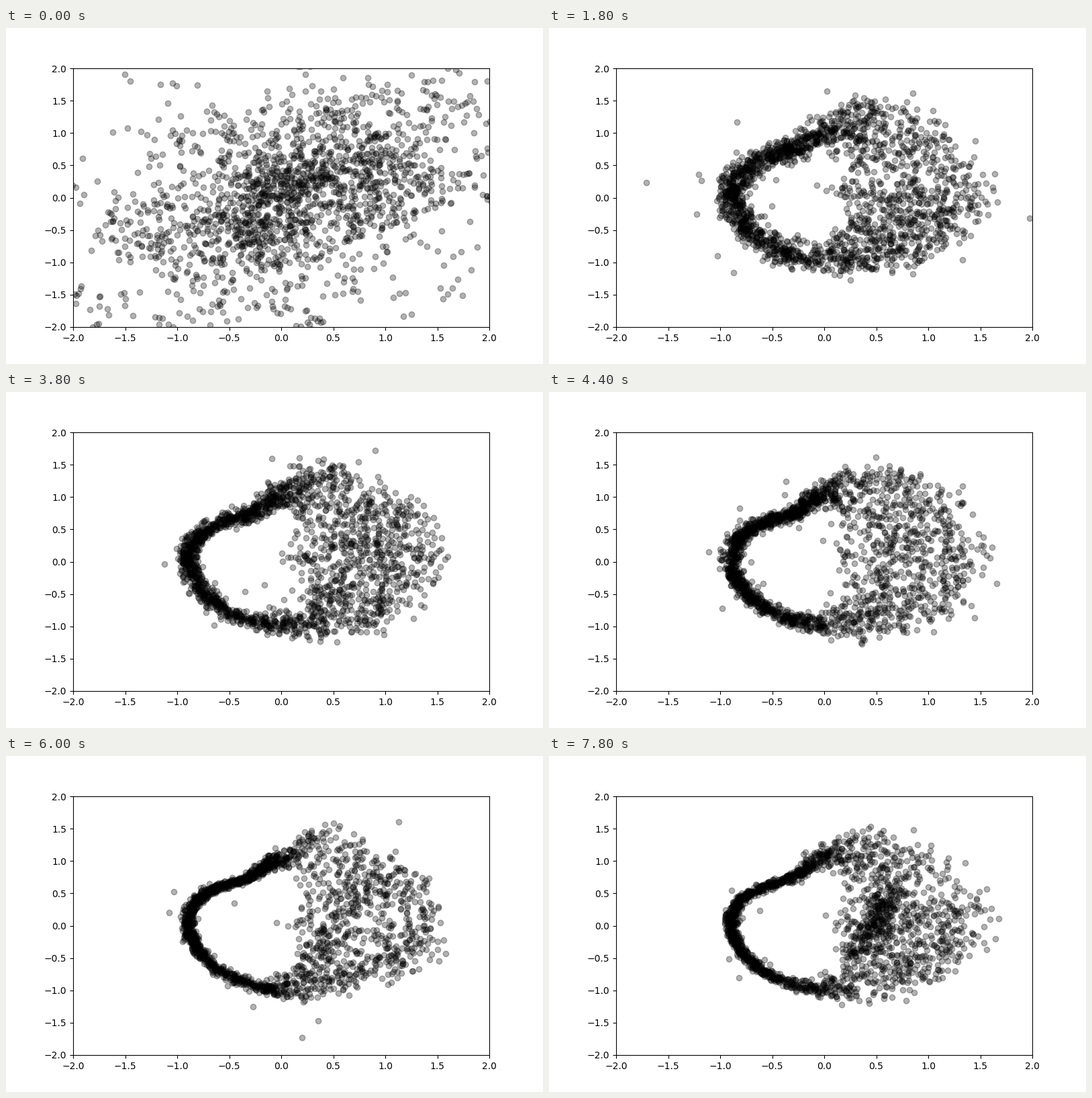
Write a matplotlib script that moves like this. It is 800x500 px and loops after 8000 ms.

```python
import numpy as np
import matplotlib.pyplot as plt
from matplotlib.animation import FuncAnimation

FRAMES, STEP = 40, 200
COUNT, PARENTS = 2000, 1100
OUTER = np.array([.3, .1])    # centre of the rim
INNER = np.array([.2, .05])   # point the right side fills towards


def bump(a, mid, width):
    return np.exp(-((a - mid) / width) ** 2)


def clump(rng, parents, jitter):
    """Scatter the points around randomly shared parents."""
    pick = rng.integers(len(parents), size=COUNT)
    return parents[pick] + jitter * rng.normal(size=(COUNT, 2))


def start_cloud(rng):
    core = rng.multivariate_normal([0, 0], [[.7, .27], [.27, .6]], PARENTS)
    tail = np.sqrt(5 / rng.chisquare(5, (PARENTS, 1)))
    return clump(rng, [.17, .1] + core * tail, .09)


def ring(rng, t):
    late = np.clip((t - 1) / 5, 0, 1) ** .6
    u, v = clump(rng, rng.random((PARENTS, 2)), [.01, .06]).T

    # More points end up on the left side as time passes
    b = 2 * np.pi * (u % 1)
    a = b + (.15 + .25 * late) * np.sin(b)
    radius = 1.2 - .3 * bump(a, 2.3, .45) + .2 * bump(a, 1.4, .3)
    rim = OUTER + radius[:, None] * np.column_stack([np.cos(a), np.sin(a)])

    # Thin on the left, filled on the right
    fill = 1 / (1 + np.exp(-(3.5 + 2.5 * late) * (np.cos(a) + .1)))
    inward = fill * (1 - np.sqrt(np.clip(v, 0, 1)))
    pts = rim + inward[:, None] * (INNER - rim)

    spread = .1 - .07 * late + .06 * fill
    spread *= np.where(rng.random(COUNT) < .015, 4, 1)
    pts += spread[:, None] * rng.normal(size=(COUNT, 2))

    sway = .06 * np.cos(2 * np.pi * (t - 2.6) / 2.6) * (1 - t / 8)
    pts[:, 0] *= np.where(pts[:, 0] > 0, 1 + sway, 1)
    return pts


def add_ridge(rng, pts, t):
    n = int(200 * np.clip((t - 5.5) / 2.3, 0, 1))
    s = rng.random((n, 1))
    swap = rng.choice(COUNT, n, replace=False)
    pts[swap] = [.27, -.45] + s * [.4, 1.05] + rng.normal(0, .08, (n, 2))
    return pts


def by_angle(pts):
    return pts[np.argsort(np.arctan2(pts[:, 1], pts[:, 0]))]


def points(i):
    rng = np.random.default_rng(100 + i)
    t = i * STEP / 1000
    if t >= 1:
        return add_ridge(rng, ring(rng, t), t)
    p = 1 - (1 - t) ** 2
    return (1 - p) * by_angle(start_cloud(rng)) + p * by_angle(ring(rng, 1))


fig, ax = plt.subplots(figsize=(8, 5), dpi=100)
dots, = ax.plot([], [], "ko", alpha=.3)
ax.set_xlim(-2, 2)
ax.set_ylim(-2, 2)


def draw(i):
    dots.set_data(*points(i).T)
    return dots,


anim = FuncAnimation(fig, draw, frames=FRAMES, interval=STEP,
                     repeat=True, repeat_delay=0)
plt.show()
```
